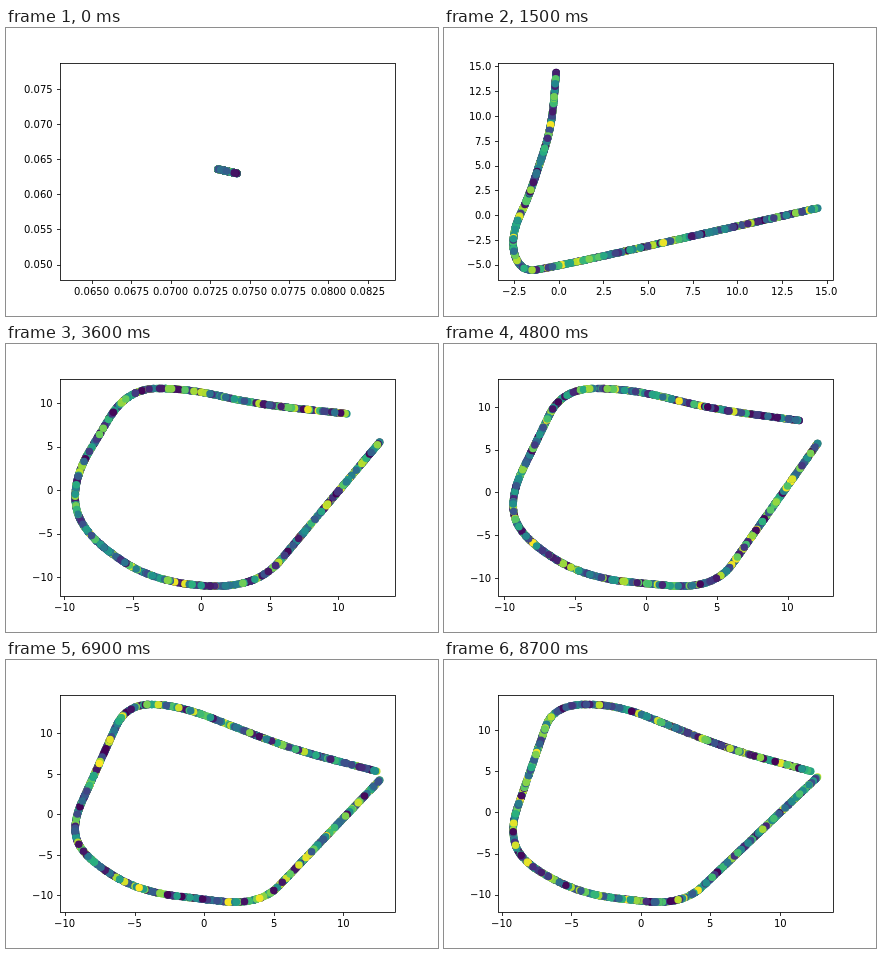
Animation of 432 by 288 pixels, one loop 9 s. Source, as an HTML page with a canvas:

```html
<!DOCTYPE html>
<html>
<head>
<meta charset="utf-8">
<style>
html, body { margin: 0; width: 100%; height: 100%; overflow: hidden; background: #fff; }
canvas { display: block; }
</style>
</head>
<body>
<canvas id="stage" width="432" height="288"></canvas>
<script>
const ctx = document.getElementById('stage').getContext('2d');
const STEP_MS = 300, STEPS = 30, SAMPLES = 600, DOTS = 1400;
const AXES = { left: 54, right: 388.8, top: 34.56, bottom: 252 };

const VIRIDIS = ['440154', '472d7b', '3b528b', '2c728e', '21918c', '28ae80', '5ec962', 'addc30', 'fde725']
  .map(hex => [0, 2, 4].map(i => parseInt(hex.slice(i, i + 2), 16)));

const lerp = (a, b, u) => a + (b - a) * u;
const mix = (p, q, u) => p.map((v, k) => lerp(v, q[k], u));
const distance = (p, q) => Math.hypot(q[0] - p[0], q[1] - p[1]);

// Corners of the open outline in data units; they glide from pose to pose.
const corners = text => text.split(' ').map(pair => pair.split(',').map(Number));
const poses = [
  { step: 0, shape: Array.from({ length: 9 }, (_, i) => [.073 + .0012 * i / 8, .0636 - .0006 * i / 8]) },
  { step: 5, shape: corners('-.15,14.4 -.4,9 -1.1,5 -1.75,1.6 -2.5,-1.2 -2.6,-3.8 -2,-5.6 -.9,-5.5 14.5,.7') },
  { step: 8, shape: corners('6.2,13.5 -2.6,7.7 -5.5,6.7 -8.5,4.3 -9.4,0 -8.8,-2.3 -4.1,-9.4 .8,-10.3 14.9,4') },
  { step: 12, shape: corners('10.6,8.8 3.9,9.9 -1,11.7 -5.4,11.7 -9.4,1.2 -8.9,-4.6 -3.6,-10.6 4,-11.4 13,5.5') },
  { step: 16, shape: corners('10.8,8.4 4.4,9.8 -1,12.1 -5.9,12.2 -9.6,-.4 -9,-5 -4.4,-10 4.8,-11.4 12.1,5.7') },
  { step: 23, shape: corners('12.4,5.3 6.2,8.1 -1.9,13.5 -5.6,13.6 -9.5,-1.2 -8.8,-5 -4.8,-9.5 4,-11.3 12.6,4.2') },
  { step: 29, shape: corners('12.2,5 6.3,7.7 -1.9,13.2 -6.3,13 -9.4,-2 -8.6,-6 -4.2,-10 3,-11.3 12.7,4.3') }
];

function shapeAt(step) {
  const next = Math.max(1, poses.findIndex(p => p.step >= step));
  const a = poses[next - 1], b = poses[next];
  let u = (step - a.step) / (b.step - a.step);
  if (next === 1) u = 1 - (1 - u) ** 2;
  return a.shape.map((p, i) => mix(p, b.shape[i], u));
}

// Replaces each inner corner by a quadratic curve.
function roundCorners(shape, radius) {
  const line = [shape[0]];
  const cut = (from, to) => mix(from, to, Math.min(.5, radius / distance(from, to)));
  for (let i = 1; i < shape.length - 1; i++) {
    const corner = shape[i], a = cut(corner, shape[i - 1]), b = cut(corner, shape[i + 1]);
    for (let u = 0; u <= 1; u += 1 / 16) {
      line.push(mix(mix(a, corner, u), mix(corner, b, u), u));
    }
  }
  return [...line, shape[shape.length - 1]];
}

// Evenly spaced points along a polyline.
function resample(line) {
  const along = [0];
  for (let i = 1; i < line.length; i++) along.push(along[i - 1] + distance(line[i - 1], line[i]));
  let i = 0;
  return Array.from({ length: SAMPLES + 1 }, (_, n) => {
    const d = along[line.length - 1] * n / SAMPLES;
    while (i < line.length - 2 && along[i + 1] < d) i++;
    return mix(line[i], line[i + 1], (d - along[i]) / (along[i + 1] - along[i] || 1));
  });
}

function autoscale(curve) {
  const smallestPad = [.01, .0152];
  return [0, 1].flatMap(k => {
    const values = curve.map(p => p[k]);
    const low = Math.min(...values), high = Math.max(...values);
    const pad = Math.max((high - low) * .05, smallestPad[k]);
    return [low - pad, high + pad];
  });
}

function toStage([x, y], [x0, x1, y0, y1]) {
  return [lerp(AXES.left, AXES.right, (x - x0) / (x1 - x0)),
          lerp(AXES.bottom, AXES.top, (y - y0) / (y1 - y0))];
}

function ticks(low, high) {
  const raw = (high - low) / 9, unit = 10 ** Math.floor(Math.log10(raw));
  const size = [1, 2, 2.5, 5, 10].find(s => s * unit >= raw) * unit;
  let digits = 0;
  while (Math.abs(size * 10 ** digits - Math.round(size * 10 ** digits)) > 1e-6) digits++;
  const out = [];
  for (let k = Math.ceil(low / size); k * size <= high; k++) {
    out.push([k * size, (k * size).toFixed(digits).replace('-', '\u2212')]);
  }
  return out;
}

function random(seed) {
  return () => {
    seed = seed + 0x6D2B79F5 | 0;
    let t = Math.imul(seed ^ seed >>> 15, 1 | seed);
    t = t + Math.imul(t ^ t >>> 7, 61 | t) ^ t;
    return ((t ^ t >>> 14) >>> 0) / 2 ** 32;
  };
}

function viridis(v) {
  const x = v * (VIRIDIS.length - 1), i = Math.min(VIRIDIS.length - 2, Math.floor(x));
  return `rgb(${mix(VIRIDIS[i], VIRIDIS[i + 1], x - i).map(Math.round)})`;
}

function drawDots(curve, limits, rand) {
  for (let i = 0; i < DOTS; i++) {
    const u = i < 2 ? i : rand();
    const [x, y] = toStage(curve[Math.round(u * SAMPLES)], limits);
    ctx.fillStyle = viridis(rand() ** 1.2);
    ctx.beginPath();
    ctx.arc(x, y, 3.75, 0, 2 * Math.PI);
    ctx.fill();
  }
}

// Text starts on whole pixels; anchor is the share of its width left of x.
function drawLabel(text, x, baseline, anchor) {
  ctx.fillText(text, Math.round(x - ctx.measureText(text).width * anchor), Math.round(baseline));
}

function drawAxes(limits) {
  const [x0, x1, y0, y1] = limits;
  const snap = v => Math.round(v) + .5;
  ctx.strokeStyle = ctx.fillStyle = '#000';
  ctx.lineWidth = .8;
  ctx.font = '10px "DejaVu Sans", sans-serif';
  ctx.strokeRect(54.5, 35.5, 335, 217);
  ctx.beginPath();
  for (const [value, label] of ticks(x0, x1)) {
    const [x] = toStage([value, y0], limits);
    ctx.moveTo(snap(x), 252.5);
    ctx.lineTo(snap(x), 256);
    drawLabel(label, x, 267, .5);
  }
  for (const [value, label] of ticks(y0, y1)) {
    const [, y] = toStage([x0, value], limits);
    ctx.moveTo(54.5, snap(y));
    ctx.lineTo(51, snap(y));
    drawLabel(label, 47, y + 3.8, 1);
  }
  ctx.stroke();
}

function draw(step) {
  const radius = 2 + 20 / Math.max(step, 5);
  const curve = resample(roundCorners(shapeAt(step), radius));
  const limits = autoscale(curve);
  ctx.fillStyle = '#fff';
  ctx.fillRect(0, 0, 432, 288);
  drawDots(curve, limits, random(step * 7919 + 11));
  drawAxes(limits);
}

let shown = -1;
function tick() {
  const step = Math.floor(performance.now() / STEP_MS) % STEPS;
  if (step !== shown) draw(shown = step);
  requestAnimationFrame(tick);
}
tick();
</script>
</body>
</html>
```
